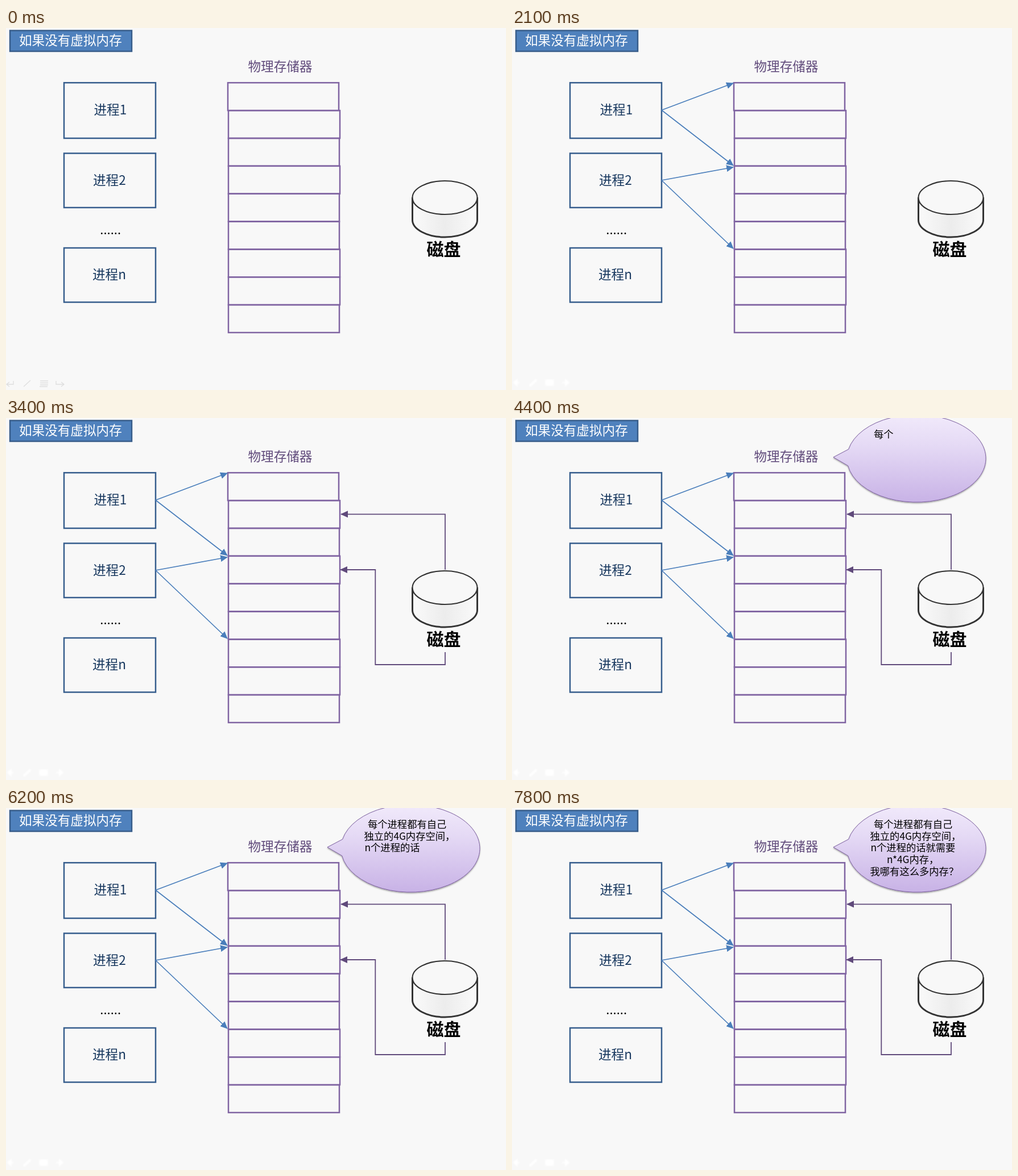
Recreate the animation shown at these times as an HTML page. Size 879 px wide and 637 px high, loop 8 s.

```html
<!DOCTYPE html>
<html lang="zh-CN">
<head>
<meta charset="utf-8">
<title>如果没有虚拟内存</title>
<style>
  html, body { margin: 0; width: 100%; height: 100%; overflow: hidden; background: #f8f8f8; }
  svg { display: block; width: 879px; height: 637px; }
  text { font: 300 22.6px "Noto Sans CJK SC", "Noto Sans CJK", "Noto Sans", sans-serif; white-space: pre; }
  .proc rect { fill: none; stroke: #365d8d; stroke-width: 2.5; }
  .proc text { fill: #17375e; }
  #cells { fill: none; stroke: #8064a2; stroke-width: 2.5; }
  .blue { fill: none; stroke: #4a7ebb; stroke-width: 1.7; }
  .violet { fill: none; stroke: #604a7b; stroke-width: 1.8; }
  #bubble text { font-size: 17.3px; fill: #000; }
  .mark { font-family: "Noto Sans CJK TC", "Noto Sans CJK", sans-serif; }
</style>
</head>
<body>
<svg viewBox="0 0 879 637" xmlns="http://www.w3.org/2000/svg">
  <defs>
    <marker id="headBlue" markerUnits="userSpaceOnUse" markerWidth="13" markerHeight="12" refX="12" refY="6" orient="auto">
      <path d="M0 0L13 6L0 12Z" fill="#4a7ebb"/>
    </marker>
    <marker id="headViolet" markerUnits="userSpaceOnUse" markerWidth="13" markerHeight="12" refX="12" refY="6" orient="auto">
      <path d="M0 0L13 6L0 12Z" fill="#604a7b"/>
    </marker>
    <linearGradient id="lilac" x1="0" y1="0" x2="0" y2="1">
      <stop offset="0" stop-color="#f1eafb"/>
      <stop offset=".35" stop-color="#e5daf5"/>
      <stop offset="1" stop-color="#c8b2e6"/>
    </linearGradient>
    <linearGradient id="steel">
      <stop offset="0" stop-color="#fafafa"/>
      <stop offset=".5" stop-color="#ececec"/>
      <stop offset="1" stop-color="#fafafa"/>
    </linearGradient>
    <filter id="shade" x="-5%" y="-5%" width="110%" height="115%">
      <feDropShadow dx="0" dy="1.5" stdDeviation="1.2" flood-color="#000" flood-opacity=".38"/>
    </filter>
    <filter id="soft"><feGaussianBlur stdDeviation=".9"/></filter>
    <filter id="edge"><feGaussianBlur stdDeviation=".45"/></filter>
  </defs>

  <rect width="879" height="637" fill="#f8f8f8"/>
  <rect x="7" y="4.5" width="214" height="36.5" fill="#4f81bd" stroke="#385d8a" stroke-width="2.5"/>
  <text x="23" y="29.5" fill="#fff">如果没有虚拟内存</text>
  <text x="425.5" y="75.8" fill="#604a7b">物理存储器</text>

  <g class="proc">
    <rect x="102" y="96.3" width="161" height="97.7"/><text x="154.5" y="151.6">进程1</text>
    <rect x="102" y="220.5" width="161" height="95.5"/><text x="153" y="275.6">进程2</text>
    <rect x="102" y="387" width="161" height="95.5"/><text x="152" y="441.6">进程n</text>
  </g>
  <text x="165.3" y="362.5" style="font-size:22px;font-weight:400">......</text>
  <g id="cells"></g>

  <g filter="url(#edge)" stroke="#333">
    <path d="M714.5 298V338C714.5 354 740 368 771.5 368S828.500 354 828.500 338V298" fill="url(#steel)" stroke-width="3"/>
    <ellipse cx="771.5" cy="298.500" rx="57" ry="29.5" fill="#f8f8f8" stroke-width="2.2"/>
  </g>
  <text x="739.5" y="400" style="font-size:30px;font-weight:700">磁盘</text>

  <g id="toolsGrey" fill="none" stroke="#dedede" stroke-width="1.3">
    <path d="M13 621V627H2M6 623L1 627L6 631"/>
    <path d="M31 631L43 620"/>
    <path d="M60 621H74M60 624.500H74M60 628H74M59 631H73"/>
    <path d="M88 621V627H101M97 623L102 627L97 631"/>
  </g>
  <g id="toolsWhite" fill="#fff" stroke="#fff" filter="url(#soft)">
    <path d="M3 624L9 619V629ZM9 624H13" stroke-width="2"/>
    <path d="M31 630L43 619" stroke-width="4"/>
    <rect x="59" y="619" width="14" height="10"/>
    <path d="M100 624L94 619V629ZM94 624H88" stroke-width="2"/>
  </g>

  <g id="arrows"></g>

  <g id="bubble">
    <path d="M591.7 55A122 77 0 1 1 590.7 84L565 69Z" fill="url(#lilac)" stroke="#7d60a0" filter="url(#shade)"/>
  </g>
</svg>
<script>
const NS = "http://www.w3.org/2000/svg";
const LOOP = 8000, TICK = 100, SOFT = 30;
const byId = id => document.getElementById(id);

function add(parent, tag, attrs = {}) {
  const el = document.createElementNS(NS, tag);
  for (const key in attrs) el.setAttribute(key, attrs[key]);
  parent.appendChild(el);
  return el;
}

// Memory cells, with their slightly uneven right edges
[585, 587, 586, 587, 586, 586, 587, 587, 586].forEach((right, i) => {
  const x = i ? 391 : 390;
  add(byId("cells"), "rect", { x, y: 96.3 + i * 48.85, width: right - x, height: 48.85 });
});

// Arrow pairs, each wiped in horizontally between two x positions
const wipes = [
  { start: 500, steps: 5, from: 262, to: 391, look: "blue", head: "headBlue",
    paths: ["M263 144.5L389 97", "M263 144.5L389 242"] },
  { start: 1700, steps: 5, from: 262, to: 391, look: "blue", head: "headBlue",
    paths: ["M263 268L389 245", "M263 268L389 388"] },
  { start: 2900, steps: 6, from: 774, to: 586, look: "violet", head: "headViolet",
    paths: ["M772 267V169.300H589", "M772 412V434H649.300V267H588"] }
];

wipes.forEach((w, i) => {
  const defs = document.querySelector("defs");
  w.fade = add(defs, "linearGradient", { id: "fade" + i, gradientUnits: "userSpaceOnUse", y1: 0, y2: 0 });
  add(w.fade, "stop", { offset: 0, "stop-color": "#fff" });
  add(w.fade, "stop", { offset: 1, "stop-color": "#000" });
  const mask = add(defs, "mask", { id: "wipe" + i, maskUnits: "userSpaceOnUse", x: 0, y: 0, width: 879, height: 637 });
  add(mask, "rect", { width: 879, height: 637, fill: `url(#fade${i})` });
  w.group = add(byId("arrows"), "g", { class: w.look });
  for (const d of w.paths) add(w.group, "path", { d, "marker-end": `url(#${w.head})` });
});

// Speech, word by word: [time, word]
const speech = [
  { x: 636, words: [[4400, "每个"], [4500, "进程"], [4600, "都"], [4800, "有"], [4900, "自己"]] },
  { x: 629.5, words: [[5100, "独立"], [5200, "的"], [5300, "4G内存"], [5500, "空间"], [5600, "，"]] },
  { x: 630.5, words: [[5700, "n"], [5900, "个"], [6000, "进程"], [6200, "的话"], [6300, "就"], [6400, "需要"]] },
  { x: 659, words: [[6600, "n*"], [6700, "4G内存"], [6800, "，"]] },
  { x: 629.5, words: [[7100, "我"], [7200, "哪"], [7400, "有这么"], [7500, "多"], [7700, "内存"], [7800, "？"]] }
];

const words = speech.flatMap((line, i) => {
  const text = add(byId("bubble"), "text", { x: line.x, y: 34.8 + i * 20.7 });
  return line.words.map(([at, word]) => {
    const el = add(text, "tspan", /[，？]/.test(word) ? { class: "mark" } : {});
    el.textContent = word;
    return { at, el };
  });
});

const show = (el, on) => { el.style.visibility = on ? "visible" : "hidden"; };

function draw(t) {
  wipes.forEach((w, i) => {
    const step = Math.floor((t - w.start) / TICK) + 1;
    const p = Math.max(0, Math.min(1, step / w.steps));
    const soft = SOFT * Math.sign(w.to - w.from);
    const edge = w.from + (w.to - w.from + soft) * p;
    w.fade.setAttribute("x1", edge - soft);
    w.fade.setAttribute("x2", edge);
    if (p < 1) w.group.setAttribute("mask", `url(#wipe${i})`);
    else w.group.removeAttribute("mask");
    show(w.group, p > 0);
  });
  show(byId("toolsGrey"), t < 1700);
  show(byId("toolsWhite"), t >= 1700);
  byId("bubble").style.display = t >= 4400 ? "" : "none";
  for (const { at, el } of words) show(el, t >= at);
}

const origin = performance.now();
function frame() {
  draw((performance.now() - origin) % LOOP);
  requestAnimationFrame(frame);
}
frame();
</script>
</body>
</html>
```
